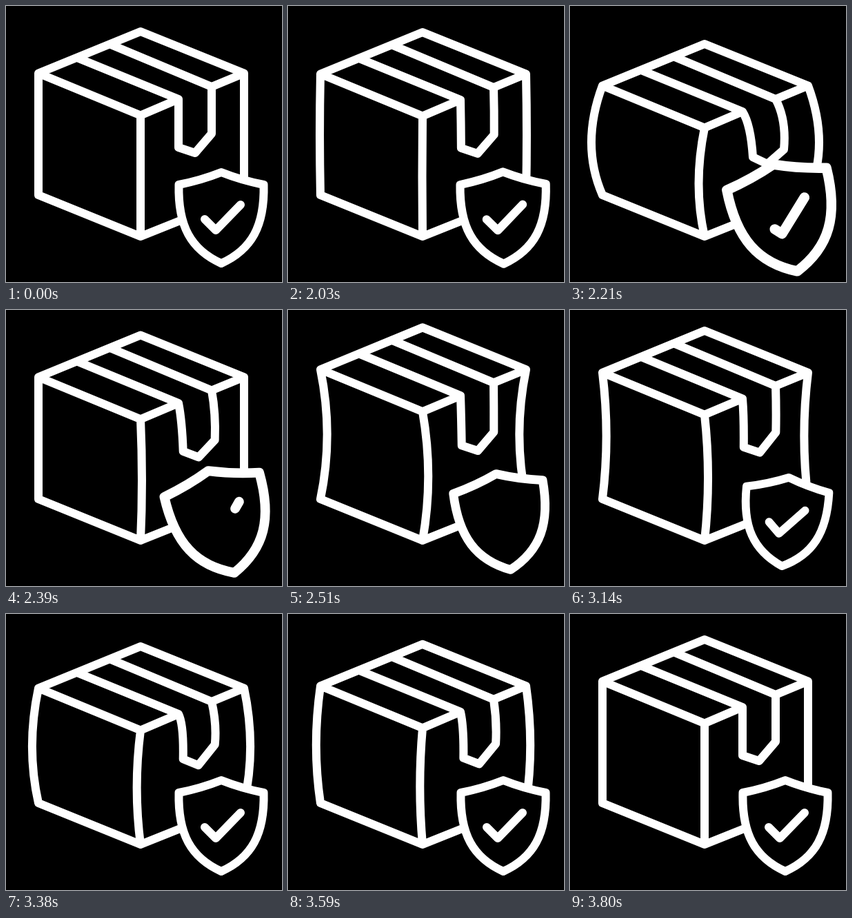
Write an HTML page that moves like this. It is 400 px wide and 400 px high and loops after 3830 ms.

```html
<!DOCTYPE html>
<html lang="en">
<head>
<meta charset="utf-8">
<title>Protected parcel</title>
<style>
  html, body { margin: 0; width: 100%; height: 100%; overflow: hidden; background: #000; }
  svg { display: block; width: 100%; height: 100%; }

  path {
    fill: none;
    stroke: #fff;
    stroke-width: 12;
    stroke-linecap: round;
    stroke-linejoin: round;
  }

  .box, .tilt, .pulse, .check {
    animation: 3830ms cubic-bezier(.333, 0, .667, 1) infinite;
  }
  .box { animation-name: squash; }
  .tilt, .pulse { transform-origin: 312px 307px; }
  .tilt { animation-name: tilt; }
  .pulse { animation-name: pulse; }
  .shield { fill: #000; }
  .check { stroke-dasharray: 100 200; animation-name: redraw; }

  /* Rest, squashed, stretched, lightly squashed, rest */
  @keyframes squash {
    0%, 52.219%, 99.217%, 100% {
      d: path("M250 135 L195 158.5 L47 97.5 L195 37 L345 97.5 L298 117 M47 97.5 Q47 186 47 274 L195 334 L345 274 Q345 186 345 97.5 M195 158.5 Q195 246 195 334 M103 75 L250 135 Q250 170 250 205 L274 213 L298 185 Q298 150 298 117 L152 56");
    }
    57.702% {
      d: path("M250 153 L195 176.5 L47 115.5 L195 55 L345 115.5 L298 135 M47 115.5 Q15 201 47 274 L195 334 L345 274 Q377 201 345 115.5 M195 176.5 Q178 260 195 334 M103 93 L250 153 Q262 172 265 219 L286 229 L310 208 Q314 165 298 135 L152 74");
      animation-timing-function: cubic-bezier(.25, .1, .25, 1);
    }
    74.151%, 75.718% {
      d: path("M250 116 L195 139 L47 78 L195 17 L345 78 L298 97 M47 78 Q81 175 47 274 L195 334 L345 274 Q311 175 345 78 M195 139 Q221 236 195 334 M103 55 L250 116 Q248 150 248 190 L272 197 L295 168 Q294 135 298 97 L152 36");
    }
    89.817% {
      d: path("M250 146 L195 169.5 L47 108.5 L195 48 L345 108.5 L298 128 M47 108.5 Q27 194 47 274 L195 334 L345 274 Q365 194 345 108.5 M195 169.5 Q183 253 195 334 M103 86 L250 146 Q258 160 257 211 L279 220 L303 190 Q306 160 298 128 L152 67");
    }
  }

  @keyframes tilt {
    0%, 52.219%, 87.467%, 100% { rotate: 0deg; }
    60.052% { rotate: -16deg; }
    75.718% { rotate: 10deg; }
  }

  @keyframes pulse {
    0%, 52.219%, 87.467%, 100% { scale: 1; }
    58.486% { scale: 1.21; }
    72.585% { scale: .92; }
  }

  /* Erases from the start, then draws again */
  @keyframes redraw {
    0%, 55.352% { stroke-dashoffset: 0; }
    64.752% { stroke-dashoffset: -102; animation-timing-function: step-end; }
    65.535% { stroke-dashoffset: 102; }
    77.285%, 100% { stroke-dashoffset: 0; }
  }
</style>
</head>
<body>
<svg viewBox="0 0 400 400">
  <path class="box" d="M250 135 L195 158.5 L47 97.5 L195 37 L345 97.5 L298 117 M47 97.5 Q47 186 47 274 L195 334 L345 274 Q345 186 345 97.5 M195 158.5 Q195 246 195 334 M103 75 L250 135 Q250 170 250 205 L274 213 L298 185 Q298 150 298 117 L152 56"/>
  <g class="tilt">
    <g class="pulse">
      <path class="shield" d="M250.5 259 Q283 252.5 312 241 Q341 252.5 373.5 259 C375 319 356 353 312 373 C268 353 249 319 250.5 259 Z"/>
      <path class="check" pathLength="100" d="M288 309 L304 325 L340 288"/>
    </g>
  </g>
</svg>
</body>
</html>
```
